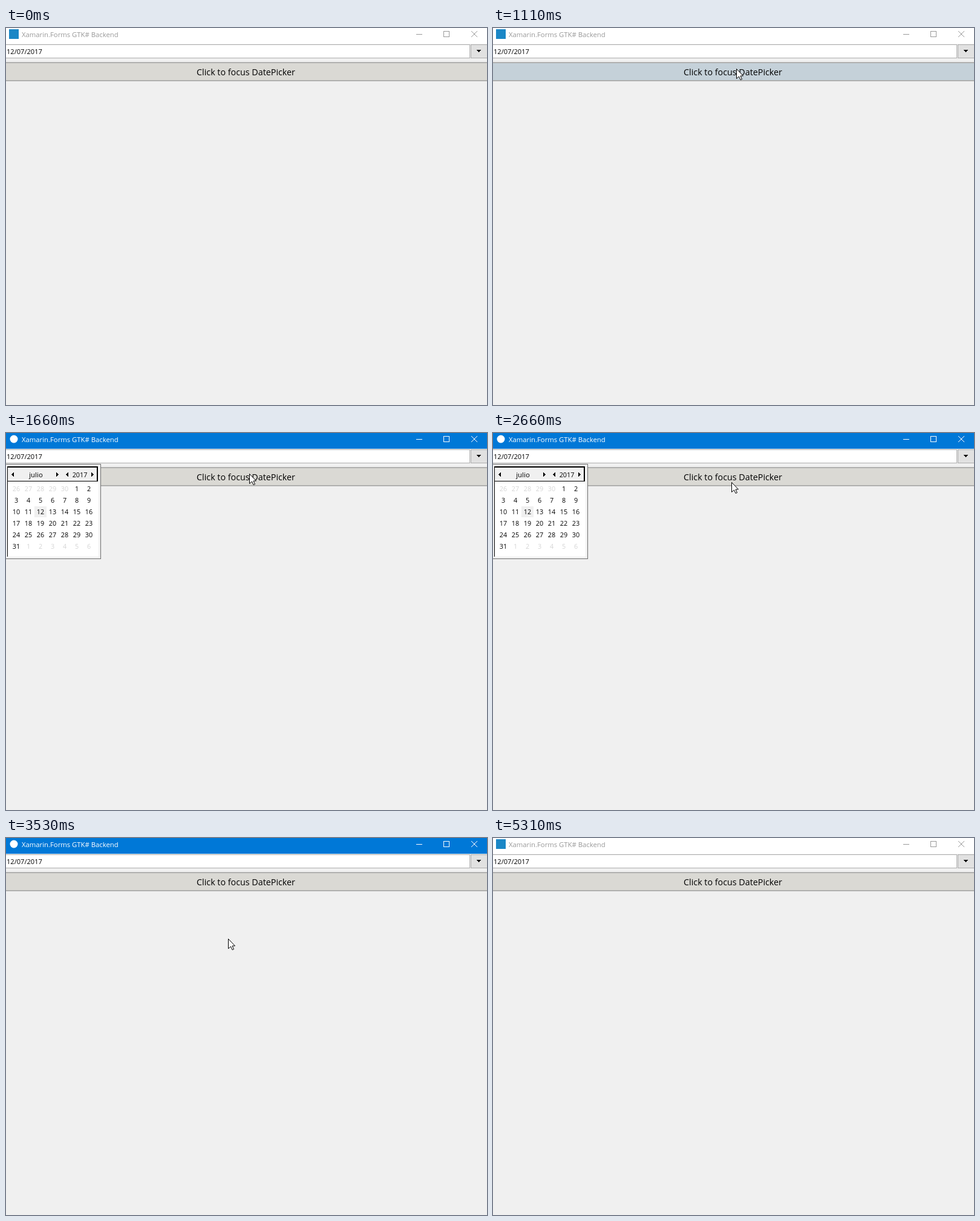
An HTML page with a canvas for the animation above (5.41 s loop, 795 by 622 pixels).

```html
<!DOCTYPE html>
<html lang="en">
<head>
<meta charset="utf-8">
<title>DatePicker focus</title>
<style>
html, body { margin: 0; height: 100%; overflow: hidden; background: #f0f0f0; }
canvas { display: block; }
</style>
</head>
<body>
<canvas id="stage" width="795" height="622"></canvas>
<script>
const ctx = document.getElementById('stage').getContext('2d');
const LOOP = 5410;
const FONT = '"Open Sans", "Noto Sans", sans-serif';
const POINTER = new Path2D('M.5 .5v16l4-3.5 2.5 5.5 2.5-1-2.5-5.5h4.5z');

const point = (x, y) => ({ x, y });
const entry = point(760, 710);
const pause = point(464, 257);
const button = point(402, 67);
const below = point(367, 166);
const exit = point(777, 395);

// Pointer strokes: each curves from one rest point to the next in hard steps.
const strokes = [
  { start: 70, end: 270, steps: 4, from: entry, bend: point(580, 400), to: pause },
  { start: 510, end: 1110, steps: 9, from: pause, bend: point(412, 75), to: button },
  { start: 2660, end: 3190, steps: 8, from: button, bend: point(367, 126), to: below },
  { start: 4070, end: 4230, steps: 3, from: below, bend: point(480, -93), to: exit }
];

function cursorAt(t) {
  const stroke = strokes.filter(s => s.start <= t).pop();
  if (!stroke || t >= 4300) return null;
  const { start, end, steps, from, bend, to } = stroke;
  const step = Math.floor((t - start) / (end - start) * (steps - 1) + 0.01) + 1;
  const u = Math.min(1, step / steps);
  const curve = k => Math.round(
    (1 - u) ** 2 * from[k] + 2 * u * (1 - u) * bend[k] + u * u * to[k]);
  return point(curve('x'), curve('y'));
}

function rect(x, y, w, h, color) {
  ctx.fillStyle = color;
  ctx.fillRect(x, y, w, h);
}

function text(str, x, y, size, color, align = 'left') {
  ctx.font = `${size}px ${FONT}`;
  ctx.textAlign = align;
  ctx.fillStyle = color;
  ctx.fillText(str, x, y);
}

// Pixel triangles that grow from a tip at (x, y).
function sideArrow(x, y, dir) {
  for (let i = 0; i < 4; i++) rect(x + i * dir, y - i, 1, 2 * i + 1, '#000');
}

function downArrow(x, y) {
  for (let i = 0; i < 4; i++) rect(x - i, y - i, 2 * i + 1, 1, '#000');
}

function drawTitle(active) {
  const ink = active ? '#fff' : '#999';
  rect(0, 0, 795, 26, active ? '#0078d7' : '#fff');
  if (active) {
    ctx.beginPath();
    ctx.arc(13, 10, 6.5, 0, Math.PI * 2);
    ctx.fill();
    ctx.fillStyle = ink;
    ctx.fill();
  } else {
    rect(5, 2, 16, 16, '#1b87c6');
  }
  text('Xamarin.Forms GTK# Backend', 26, 15, 11.3, ink);
  rect(678, 10, 10, 1, ink);
  ctx.strokeStyle = ink;
  ctx.strokeRect(723.5, 5.5, 9, 9);
  ctx.beginPath();
  for (const side of [-5, 5]) {
    ctx.moveTo(774 + side, 5);
    ctx.lineTo(774 - side, 15);
  }
  ctx.stroke();
}

function drawEntry() {
  rect(0, 27, 767, 23, '#adadad');
  rect(0, 28, 766, 21, '#fff');
  text('12/07/2017', 1, 43, 11.1, '#000');
  rect(768, 27, 27, 23, '#adadad');
  rect(769, 28, 26, 21, '#e1e1e1');
  downArrow(781, 39);
}

function drawButton(fill) {
  rect(0, 56, 795, 32, '#bababa');
  rect(0, 57, 795, 30, '#a8a8a6');
  rect(0, 58, 795, 28, fill);
  text('Click to focus DatePicker', 396.5, 78, 14.3, '#000', 'center');
}

function drawCalendar() {
  rect(0, 51, 157, 157, '#6f6f6f');
  rect(0, 52, 156, 155, '#f0f0f0');
  rect(2, 55, 151, 149, '#fff');
  rect(2, 55, 1, 149, '#000');
  rect(2, 55, 150, 25, '#000');
  rect(3, 57, 147, 22, '#f0f0f0');
  sideArrow(9, 68, 1);
  sideArrow(86, 68, -1);
  sideArrow(99, 68, 1);
  sideArrow(144, 68, -1);
  text('julio', 49.5, 73, 11.4, '#000', 'center');
  text('2017', 122, 73, 10.8, '#000', 'center');
  rect(47, 121, 20, 18, '#f0f0f0');
  const first = new Date(2017, 5, 26);
  for (let i = 0; i < 42; i++) {
    const date = new Date(first.getFullYear(), first.getMonth(), first.getDate() + i);
    const color = date.getMonth() === 6 ? '#000' : '#d5d5d5';
    text(date.getDate(), 17 + i % 7 * 20, 96 + Math.floor(i / 7) * 19, 10.8, color, 'center');
  }
}

function drawCursor({ x, y }) {
  ctx.save();
  ctx.translate(x, y);
  ctx.fillStyle = '#fff';
  ctx.strokeStyle = '#000';
  ctx.fill(POINTER);
  ctx.stroke(POINTER);
  ctx.restore();
}

function draw(t) {
  const cursor = cursorAt(t);
  const pressed = t >= 1490 && t < 1580;
  const hover = t < 1660 && cursor && cursor.y < 88;
  rect(0, 0, 795, 622, '#f0f0f0');
  drawTitle(t >= 1490 && t < 5310);
  drawEntry();
  drawButton(pressed ? '#aecadd' : hover ? '#c5d1d9' : '#dad9d4');
  if (t >= 1660 && t < 3380) drawCalendar();
  if (cursor) drawCursor(cursor);
}

const began = performance.now();
function tick() {
  draw((performance.now() - began) % LOOP);
  requestAnimationFrame(tick);
}
tick();
</script>
</body>
</html>
```
